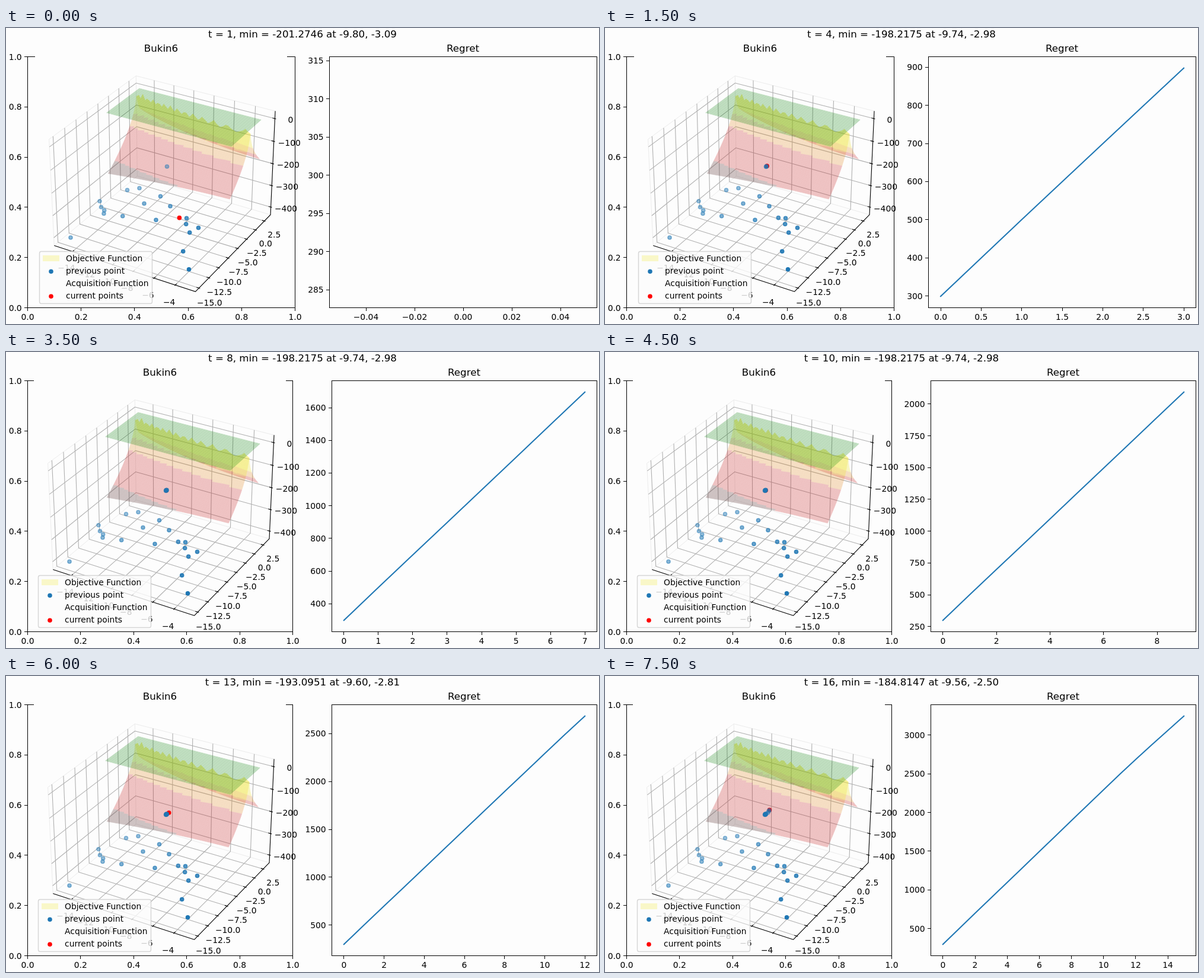
Recreate the animation shown at these times as an HTML page with a canvas. Size 1000 by 500 pixels, loop 8 s.

```html
<!DOCTYPE html>
<html lang="en">
<head>
<meta charset="utf-8">
<title>Bukin6 optimisation</title>
<style>
  html, body { margin: 0; width: 100%; height: 100%; overflow: hidden; background: #fdfdfd; }
  canvas { display: block; }
</style>
</head>
<body>
<canvas id="stage" width="1000" height="500"></canvas>
<script>
const ctx = document.getElementById('stage').getContext('2d');
const STEP = 500, COUNT = 16;
const PAPER = '#fdfdfd', BLUE = '#1f77b4', GRID = '#b0b0b0';
const TOP = 48, BOTTOM = 472;
const SMALL = 13.89, LARGE = 16.67;

const TITLES = {
  1: '-201.2746 at -9.80, -3.09',
  2: '-200.9612 at -9.79, -3.08',
  3: '-199.3616 at -9.77, -3.02',
  4: '-198.2175 at -9.74, -2.98',
  13: '-193.0951 at -9.60, -2.81',
  14: '-188.7989 at -9.59, -2.64',
  15: '-185.6312 at -9.57, -2.53',
  16: '-184.8147 at -9.56, -2.50'
};

// Sampled (x, y) of the objective, one per step
const SAMPLES = [
  [-6.46, -8.526], [-9.79, -3.08], [-9.77, -3.02], [-9.74, -2.98],
  [-9.75, -3.02], [-9.77, -3.02], [-9.78, -3.02], [-9.77, -3.02],
  [-9.77, -3.03], [-9.73, -3.02], [-9.76, -2.98], [-9.75, -2.99],
  [-9.60, -2.81], [-9.59, -2.645], [-9.57, -2.53], [-9.56, -2.50]
];

// Screen places of the starting points
const STARTS = [
  [109, 354], [158, 292.5], [160.5, 302.5], [165.7, 308], [165, 313.5],
  [196.7, 317.7], [204.5, 273.7], [225, 270.5], [233, 296.5], [260.5, 284.3],
  [277, 301], [253, 324.2], [304.5, 321.3], [303.7, 331.2], [324.5, 337.5],
  [309.7, 345.6], [298.7, 377.2], [308.5, 407.7], [271.5, 234]
];

const objective = (x, y) =>
  -100 * Math.sqrt(Math.abs(y - 0.01 * x * x)) - 0.01 * Math.abs(x + 10);

// ---- 3D projection: azimuth -60, elevation 30, distance 10 ----
const HX = 0.5715, HZ = 0.4285, PANE = 25 / 24;
const PX = HX * PANE, PZ = HZ * PANE;
const worldX = x => (x + 9) / 6.6 * HX;
const worldY = y => (y + 5.785) / 9.665 * HX;
const worldZ = z => (z + 201.75) / 224.85 * HZ;

function project(X, Y, Z) {
  const u = 0.866 * X + 0.5 * Y;
  const v = -0.25 * X + 0.433 * Y + 0.866 * Z;
  const depth = 10 - (0.433 * X - 0.75 * Y + 0.5 * Z);
  return [267 + u / depth * 2292, 254.3 - v / depth * 2292];
}
const place = (x, y, z) => project(worldX(x), worldY(y), worldZ(z));

// ---- drawing helpers ----
function polyline(c, pts, color, width, closed) {
  c.beginPath();
  pts.forEach(([x, y], i) => i ? c.lineTo(x, y) : c.moveTo(x, y));
  if (closed) c.closePath();
  c.strokeStyle = color;
  c.lineWidth = width;
  c.stroke();
}

function text(c, str, x, y, align = 'center', size = SMALL) {
  c.font = `${size}px "DejaVu Sans", sans-serif`;
  c.textAlign = align;
  c.fillStyle = '#000';
  c.fillText(str, x, y);
}

function dot(c, [x, y], color, alpha = 1) {
  c.globalAlpha = alpha;
  c.beginPath();
  c.arc(x, y, 3.1, 0, 7);
  c.fillStyle = c.strokeStyle = color;
  c.lineWidth = 1.39;
  c.fill();
  c.stroke();
  c.globalAlpha = 1;
}

const hline = (x0, x1, y) => polyline(ctx, [[x0, y + 0.5], [x1, y + 0.5]], '#000', 1);
const vline = (x, y0, y1) => polyline(ctx, [[x + 0.5, y0], [x + 0.5, y1]], '#000', 1);

function xTick(x, label) {
  vline(Math.round(x), BOTTOM + 1, BOTTOM + 6);
  text(ctx, label, x + 0.5, 493);
}

function yTick(left, y, label) {
  hline(left - 5, left, Math.round(y));
  text(ctx, label, left - 9.3, y + 5.5, 'right');
}

const signed = (v, digits) => v.toFixed(digits).replace('-', '\u2212');

function newLayer() {
  const layer = document.createElement('canvas');
  layer.width = 1000;
  layer.height = 500;
  return layer.getContext('2d');
}

// ---- translucent surfaces, built once ----
function bandColor(f) {
  if (f < -236) return 'rgb(82,40,40)';
  if (f < -132) return 'rgb(200,42,42)';
  if (f < -88) return 'rgb(226,142,44)';
  return 'rgb(238,226,40)';
}

function slope(behind) {
  const c = newLayer(), n = 50;
  const gx = i => -15 + 12 * i / n, gy = j => -5 + 8 * j / n;
  for (let j = n - 1; j >= 0; j--) {
    for (let i = 0; i < n; i++) {
      const mx = gx(i + 0.5), my = gy(j + 0.5);
      if (my > 0.01 * mx * mx !== behind) continue;
      const corners = [[i, j], [i + 1, j], [i + 1, j + 1], [i, j + 1]]
        .map(([a, b]) => [gx(a), gy(b), objective(gx(a), gy(b))]);
      c.fillStyle = bandColor(corners.reduce((s, p) => s + p[2], 0) / 4);
      const pts = corners.map(p => place(...p));
      polyline(c, pts, c.fillStyle, 0.6, true);
      c.fill();
    }
  }
  return c.canvas;
}

function ceiling() {
  const c = newLayer(), z = 2.6;
  polyline(c, [[-15, -5], [-3, -5], [-3, 3], [-15, 3]].map(p => place(...p, z)), 'green', 0.4, true);
  c.fillStyle = 'rgba(0,128,0,0.85)';
  c.fill();
  for (let i = 0; i <= 50; i++) {
    const x = -15 + 12 * i / 50;
    polyline(c, [place(x, -5, z), place(x, 3, z)], 'rgba(0,100,0,0.5)', 1.2);
  }
  return c.canvas;
}

const SURFACES = [slope(true), slope(false), ceiling()];

// ---- 3D axes ----
function range(from, to, step) {
  const out = [];
  for (let v = from; v <= to + 1e-9; v += step) out.push(v);
  return out;
}

// Each axis: ticks, digits, grid path, tick mark, label place
const TICK_OUT = PX + 0.0095, TICK_IN = PX - 0.019;
const LABEL_X = PX + 0.086, LABEL_Z = -PZ - 0.0645;
const AXES = [
  { ticks: range(-14, -4, 2), digits: 0, world: worldX,
    grid: a => [[a, -PX, -PZ], [a, PX, -PZ], [a, PX, PZ]],
    mark: a => [[a, -TICK_OUT, -PZ], [a, -TICK_IN, -PZ]],
    label: a => [a, -LABEL_X, LABEL_Z] },
  { ticks: range(-15, 2.5, 2.5), digits: 1, world: worldY,
    grid: a => [[PX, a, -PZ], [-PX, a, -PZ], [-PX, a, PZ]],
    mark: a => [[TICK_OUT, a, -PZ], [TICK_IN, a, -PZ]],
    label: a => [LABEL_X, a, LABEL_Z] },
  { ticks: range(-400, 0, 100), digits: 0, world: worldZ,
    grid: a => [[PX, PX, a], [-PX, PX, a], [-PX, -PX, a]],
    mark: a => [[TICK_OUT, PX, a], [TICK_IN, PX, a]],
    label: a => [LABEL_X, LABEL_X, a] }
];

function path3d(pts, color, width) {
  polyline(ctx, pts.map(p => project(...p)), color, width);
}

function drawBox() {
  path3d([[-PX, -PX, PZ], [-PX, PX, PZ], [PX, PX, PZ]], '#ececec', 1);
  path3d([[-PX, PX, PZ], [-PX, PX, -PZ], [PX, PX, -PZ]], '#ececec', 1);
  path3d([[-PX, -PX, PZ], [-PX, -PX, -PZ], [-PX, PX, -PZ]], '#ececec', 1);
  for (const axis of AXES)
    for (const v of axis.ticks) path3d(axis.grid(axis.world(v)), GRID, 1.11);
  path3d([[-PX, -PX, -PZ], [PX, -PX, -PZ], [PX, PX, -PZ], [PX, PX, PZ]], '#000', 1.11);
  for (const axis of AXES) {
    for (const v of axis.ticks) {
      const a = axis.world(v);
      path3d(axis.mark(a), '#000', 1.11);
      const [x, y] = project(...axis.label(a));
      text(ctx, signed(v, axis.digits), x, y + 10.6);
    }
  }
}

const fade = ([x, y]) => Math.min(1, Math.max(0.3, 0.0016 * x + 0.0027 * y - 0.594));
const samplePlace = ([x, y]) => place(x, y, objective(x, y));

function drawPoints(t) {
  dot(ctx, samplePlace(SAMPLES[t - 1]), '#f00');
  for (const p of [...STARTS, ...SAMPLES.slice(0, t - 1).map(samplePlace)])
    dot(ctx, p, BLUE, fade(p));
}

function drawLegend() {
  ctx.beginPath();
  ctx.roundRect(56.5, 377.5, 190, 88, 3);
  ctx.fillStyle = 'rgba(253,253,253,0.8)';
  ctx.strokeStyle = 'rgba(204,204,204,0.8)';
  ctx.lineWidth = 1.39;
  ctx.fill();
  ctx.stroke();
  ctx.fillStyle = '#f9f7c8';
  ctx.fillRect(62, 384, 28, 10);
  dot(ctx, [76, 411.3], BLUE);
  dot(ctx, [76, 453.3], '#f00');
  ['Objective Function', 'previous point', 'Acquisition Function', 'current points']
    .forEach((s, i) => text(ctx, s, 101, 394.3 + i * 20.9, 'left'));
}

function drawLeft(t, shift) {
  const left = 36, right = 487 - 2 * shift;
  hline(left, right + 1, TOP - 0);
  vline(left, TOP, BOTTOM + 1);
  vline(right, TOP, BOTTOM + 1);
  for (let i = 0; i <= 5; i++) {
    const label = (i / 5).toFixed(1);
    xTick(left + (right - left) * i / 5, label);
    yTick(left, BOTTOM - (BOTTOM - TOP) * i / 5, label);
  }
  ctx.fillStyle = PAPER;
  ctx.fillRect(49 - shift, TOP - 1, 425, BOTTOM - TOP);
  hline(left, right + 1, BOTTOM);

  ctx.save();
  ctx.translate(-shift, 0);
  text(ctx, 'Bukin6', 261.5, 40, 'center', LARGE);
  drawBox();
  for (const s of SURFACES) {
    ctx.globalAlpha = 0.28;
    ctx.drawImage(s, 0, 0);
  }
  ctx.globalAlpha = 1;
  drawPoints(t);
  drawLegend();
  ctx.restore();
}

// ---- regret chart ----
const REGRET = [];
SAMPLES.reduce((sum, [x, y]) => (REGRET.push(sum - objective(x, y)), REGRET[REGRET.length - 1]), 0);

// Smallest round step that gives at most nine intervals
function niceStep(span) {
  const raw = span / 9, base = 10 ** Math.floor(Math.log10(raw));
  return base * [1, 2, 2.5, 5, 10].find(m => m * base >= raw);
}

function limits(lo, hi) {
  if (lo === hi) {
    const pad = lo ? 0.055 * lo : 0.055;
    return [lo - pad, hi + pad];
  }
  const pad = (hi - lo) * 0.05;
  return [lo - pad, hi + pad];
}

function eachTick([lo, hi], draw) {
  const step = niceStep(hi - lo);
  let digits = 0;
  while (digits < 4 && Math.abs(step * 10 ** digits - Math.round(step * 10 ** digits)) > 1e-6) digits++;
  for (let k = Math.ceil(lo / step); k * step <= hi; k++)
    draw(k * step, signed(k * step, digits));
}

function drawRight(t, shift) {
  const left = 545 + 2 * shift, right = 996;
  const xl = limits(0, t - 1), yl = limits(REGRET[0], REGRET[t - 1]);
  const sx = v => left + (v - xl[0]) / (xl[1] - xl[0]) * (right - left);
  const sy = v => BOTTOM - (v - yl[0]) / (yl[1] - yl[0]) * (BOTTOM - TOP);
  eachTick(xl, (v, label) => xTick(sx(v), label));
  eachTick(yl, (v, label) => yTick(left, sy(v), label));
  if (t > 1) {
    ctx.lineJoin = 'round';
    ctx.lineCap = 'square';
    polyline(ctx, REGRET.slice(0, t).map((v, i) => [sx(i) + 0.5, sy(v) + 0.5]), BLUE, 2.08);
    ctx.lineCap = 'butt';
  }
  hline(left, right + 1, TOP);
  hline(left, right + 1, BOTTOM);
  vline(left, TOP, BOTTOM + 1);
  vline(right, TOP, BOTTOM + 1);
  text(ctx, 'Regret', 770.5 + shift, 40, 'center', LARGE);
}

function draw(now) {
  const t = 1 + Math.floor(now % (STEP * COUNT) / STEP);
  const shift = t > 4 ? 2 : 0; // four-digit labels need a wider gutter
  ctx.fillStyle = PAPER;
  ctx.fillRect(0, 0, 1000, 500);
  const best = Math.max(...Object.keys(TITLES).filter(k => k <= t));
  text(ctx, `t = ${t}, min = ${TITLES[best]}`, 500, 16, 'center', LARGE);
  drawLeft(t, shift);
  drawRight(t, shift);
}

const start = performance.now();
function tick() {
  draw(performance.now() - start);
  requestAnimationFrame(tick);
}
tick();
</script>
</body>
</html>
```
